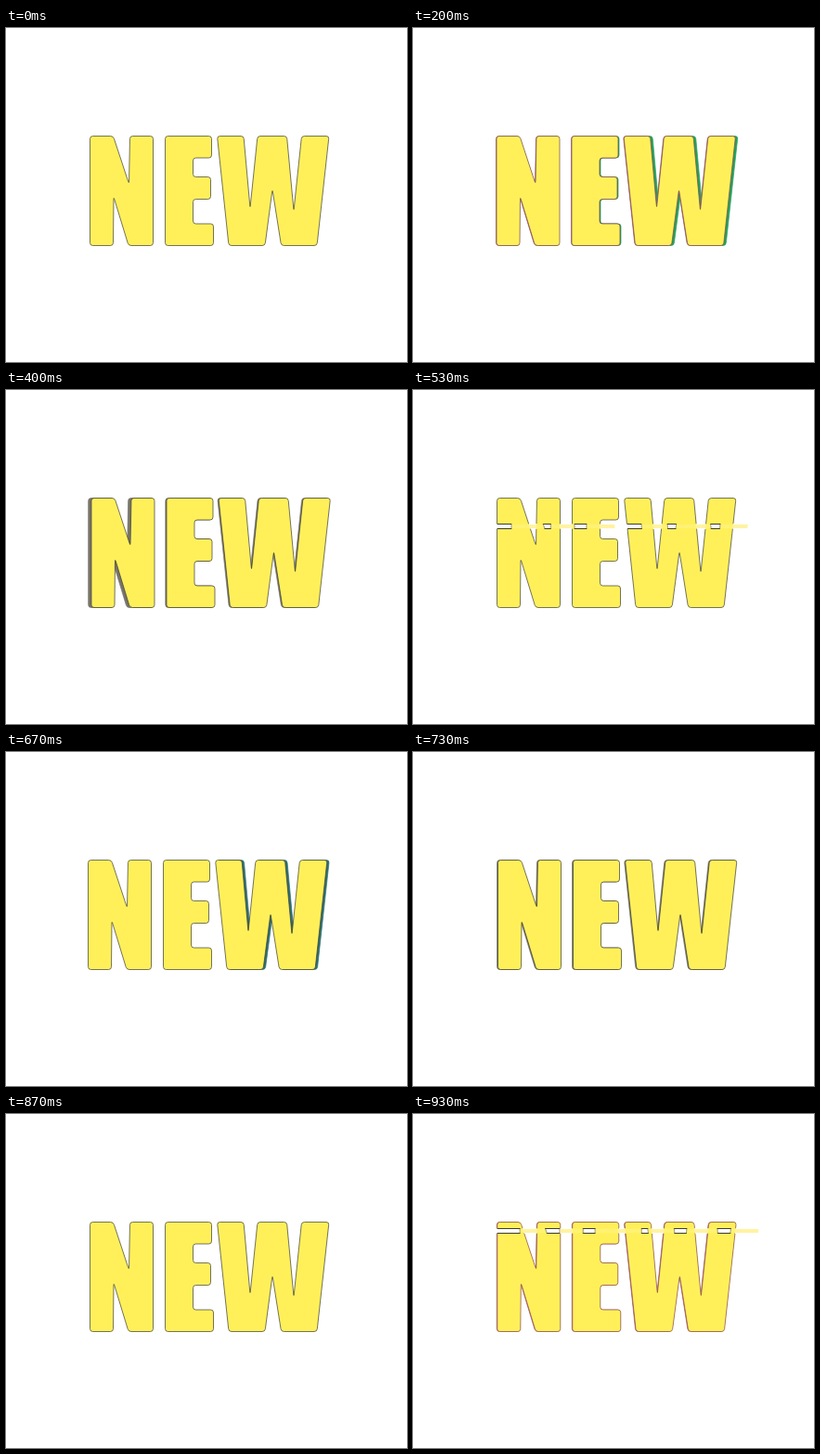
Write an HTML page with a canvas that moves like this. It is 432 by 360 pixels and loops after 990 ms.

```html
<!DOCTYPE html>
<html lang="en">
<head>
<meta charset="utf-8">
<title>New</title>
<style>
  html, body { margin: 0; width: 100%; height: 100%; overflow: hidden; background: #fff; }
  canvas { display: block; width: 432px; height: 360px; }
</style>
</head>
<body>
<canvas id="stage" width="432" height="360"></canvas>
<script>
const ctx = document.getElementById('stage').getContext('2d');
const LOOP = 990, STEPS = 15;
const YELLOW = '#fff05a', PALE = '#fff3a0', INK = '#3a3a30';
const MAGENTA = '#9b2a7c', PURPLE = '#a25fb4', GREEN = '#27a05c', TEAL = '#2f6f70', GREY = '#77746c';

// Closed outline with softly cut corners.
function outline(points, cut = 3) {
  const path = new Path2D();
  const n = points.length;
  const toward = (a, b) => {
    const k = cut / Math.hypot(b[0] - a[0], b[1] - a[1]);
    return [a[0] + (b[0] - a[0]) * k, a[1] + (b[1] - a[1]) * k];
  };
  points.forEach((p, i) => {
    const start = toward(p, points[(i + n - 1) % n]);
    const end = toward(p, points[(i + 1) % n]);
    path[i ? 'lineTo' : 'moveTo'](...start);
    path.quadraticCurveTo(...p, ...end);
  });
  path.closePath();
  return path;
}

const N = outline([[90.5, 116.5], [115.5, 116.5], [132.5, 168], [133.5, 116.5], [158.5, 116.5],
  [158.5, 234.5], [132, 234.5], [116, 182], [115.5, 234.5], [90.5, 234.5]]);
const E = outline([[171.5, 116.5], [221.5, 116.5], [221.5, 140], [201.5, 140], [201.5, 160.5], [220.5, 160.5],
  [220.5, 184.5], [201.5, 184.5], [201.5, 211], [223.5, 211], [223.5, 234.5], [171.5, 234.5]]);
const W = outline([[227.5, 116.5], [256, 116.5], [263, 194], [271, 116.5], [302.5, 116.5], [310, 197],
  [318.5, 116.5], [348, 116.5], [335, 234.5], [296.5, 234.5], [287, 174], [279, 234.5], [240, 234.5]]);
const WORD = new Path2D();
[N, E, W].forEach(letter => WORD.addPath(letter));

function paint(path, x, fill, line = INK) {
  ctx.save();
  ctx.translate(x, 0);
  ctx.fillStyle = fill;
  ctx.fill(path);
  ctx.strokeStyle = line;
  ctx.lineWidth = 0.7;
  ctx.stroke(path);
  ctx.restore();
}

function clipped(area, draw) {
  ctx.save();
  ctx.clip(area);
  draw();
  ctx.restore();
}

function box(x, y, w, h) {
  const path = new Path2D();
  path.rect(x, y, w, h);
  return path;
}

// A thin band of the word, torn off and pushed sideways.
function tear({ y, h, x }) {
  const band = box(0, y, 432, h);
  const core = box(0, y + 1, 432, h - 2);
  ctx.fillStyle = '#fff';
  ctx.fill(band);
  clipped(core, () => paint(WORD, x, PALE, PALE));
  clipped(WORD, () => {
    ctx.fillStyle = '#fff';
    ctx.fill(band);
    ctx.strokeStyle = INK;
    ctx.lineWidth = 1;
    ctx.strokeRect(-5, y + 0.5, 442, h - 1);
    clipped(band, () => paint(WORD, x, YELLOW));
    ctx.globalAlpha = 0.35;
    clipped(core, () => paint(WORD, x, PALE, PALE));
  });
}

// Broad two-tone ghost of the first stem.
function ghostStem() {
  const stem = outline([[75.5, 116.5], [102, 116.5], [102, 234.5], [75.5, 234.5]]);
  paint(stem, 0, MAGENTA);
  clipped(stem, () => {
    ctx.fillStyle = PURPLE;
    ctx.fillRect(90.5, 117, 11, 117);
  });
}

// x: face offset; back: [shape, offset, colour] drawn behind it.
const poses = [
  { x: 0 },
  { x: -1, back: [[W, 0.5, TEAL]] },
  { x: 1, back: [[WORD, 0, GREY]] },
  { x: -0.5, line: '#6f4a4a', back: [[W, 2, GREEN], [E, 0.5, GREEN], [WORD, -1, '#b0607c']] },
  { x: 0 },
  { x: -1, back: [[W, 1, GREEN]] },
  { x: 1.5, back: [[WORD, 0.3, GREY], [N, -1.8, GREY]] },
  { x: 0, line: '#6f4a4a' },
  { x: 0, tear: { y: 144, h: 6, x: 15.5 } },
  { x: 0, line: '#7d4a5c', back: [[WORD, -0.5, '#b0607c']] },
  { x: -2, back: [[W, 0.3, TEAL]] },
  { x: 1, back: [[WORD, 0, GREY]] },
  { x: 13.7, ghost: true },
  { x: 0 },
  { x: 0.3, line: '#8a5048', back: [[WORD, -0.2, '#b0607c']], tear: { y: 123, h: 6, x: 24.7 } }
];
const starts = poses.map((_, i) => Math.round(i * 20 / 3) * 10);

function render(ms) {
  let i = STEPS - 1;
  while (starts[i] > ms) i--;
  const pose = poses[i];
  ctx.fillStyle = '#fff';
  ctx.fillRect(0, 0, 432, 360);
  if (pose.ghost) ghostStem();
  (pose.back || []).forEach(([shape, x, colour]) => paint(shape, x, colour, colour));
  paint(WORD, pose.x, YELLOW, pose.line);
  if (pose.tear) tear(pose.tear);
}

function tick() {
  render(performance.now() % LOOP);
  requestAnimationFrame(tick);
}
tick();
</script>
</body>
</html>
```
